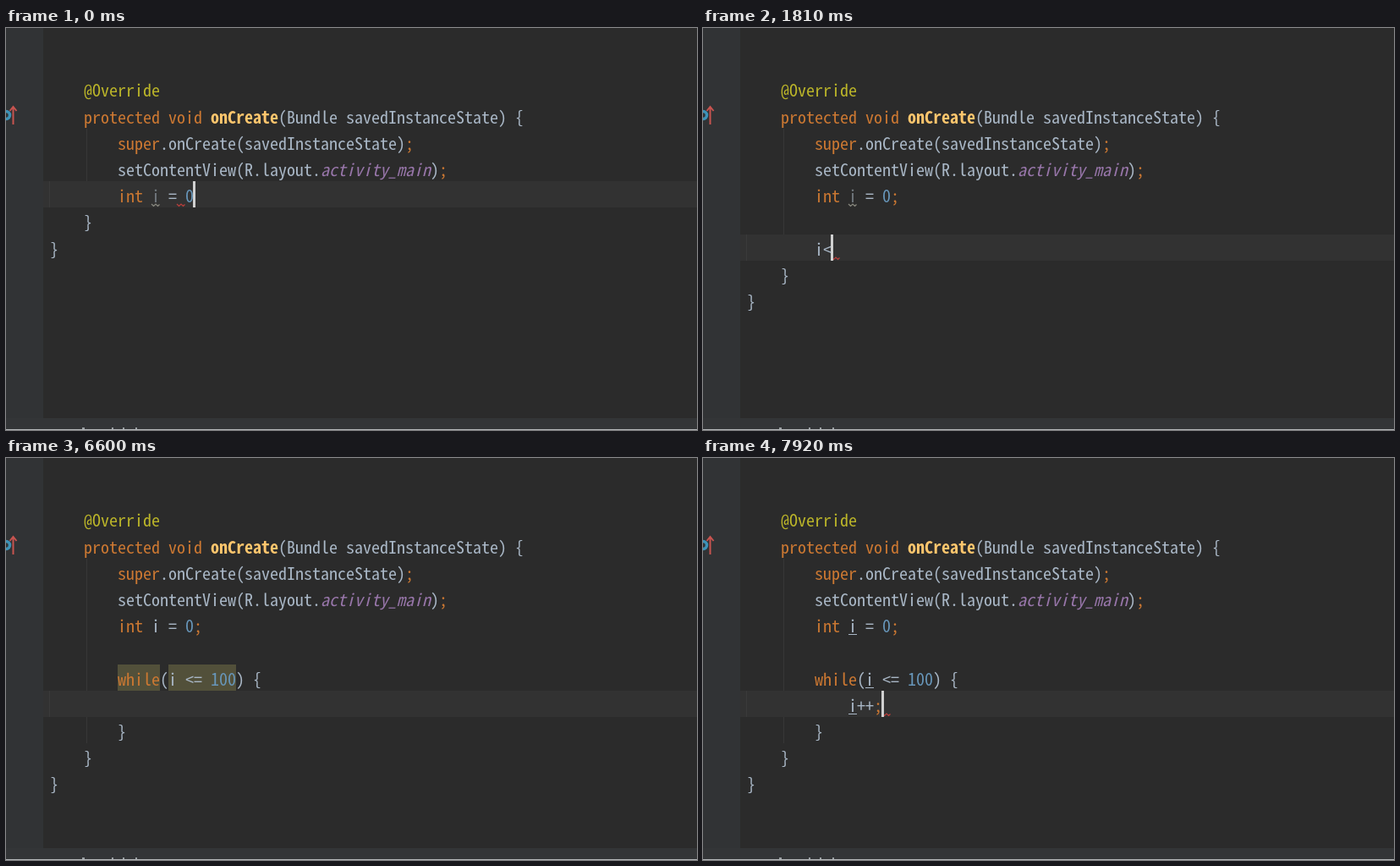
An HTML page that plays this animation: 817x475 px, repeating every 8 s.

```html
<!DOCTYPE html>
<html lang="en">
<head>
<meta charset="utf-8">
<title>Code editor</title>
<style>
  html, body { margin: 0; width: 100%; height: 100%; overflow: hidden; background: #2b2b2b; }
  svg { display: block; width: 817px; height: 475px; }
  text { text-anchor: middle; }
  .code { font-family: "Noto Sans Mono CJK SC", "Noto Sans Mono CJK JP", "Liberation Mono", monospace; }
  .icon { font: 15px Inter, sans-serif; }
</style>
</head>
<body>
<svg id="stage" viewBox="0 0 817 475" xmlns="http://www.w3.org/2000/svg"></svg>
<script>
const LOOP = 8000, LEFT = 52, CELL = 10;
const FAMILY = '"Noto Sans Mono CJK SC", "Noto Sans Mono CJK JP", "Liberation Mono", monospace';
const svg = document.getElementById('stage');

// Keep glyphs within the ten pixel grid whichever monospaced face is present.
const probe = document.createElement('canvas').getContext('2d');
probe.font = '20px ' + FAMILY;
const SIZE = 20 * Math.min(1, 10.6 / probe.measureText('m').width);

const C = {
  plain: '#a9b7c6', keyword: '#cc7832', number: '#6897bb', note: '#bbb529',
  method: '#ffc66d', field: '#9876aa', unused: '#72797f',
  match: '#9b5f70', item: '#8a9196', dim: '#6d7678'
};

const rowY = row => Math.round(56.4 + 31.2 * row);
const colX = col => LEFT + CELL * col;
const safe = s => s.replace(/&/g, '&amp;').replace(/</g, '&lt;');
const rect = (x, y, w, h, fill, more = '') =>
  `<rect x="${x}" y="${y}" width="${w}" height="${h}" fill="${fill}" ${more}/>`;
const circle = (x, y, r, look) => `<circle cx="${x}" cy="${y}" r="${r}" ${look}/>`;
const path = (d, look) => `<path d="${d}" ${look}/>`;

// One glyph per grid cell, word by word.
function words(x, y, str, fill, more = '') {
  return [...str.matchAll(/\S+/g)].map(m => {
    const xs = [...m[0]].map((_, i) => x + CELL * (m.index + i + 0.5)).join(' ');
    return `<text class="code" font-size="${SIZE}" x="${xs}" y="${y}" fill="${fill}" ${more}>${safe(m[0])}</text>`;
  }).join('');
}

const RULES = [
  [/@\w+/y, 'note'],
  [/(?<![.\w])(?:protected|void|super|int|while)\b|;/y, 'keyword'],
  [/onCreate(?=\(Bundle)/y, 'method', 'font-weight="700"'],
  [/activity_main/y, 'field', 'font-style="italic"'],
  [/\d+/y, 'number'],
  [/\w+|[^\w]/y, 'plain']
];

function codeLine(col, row, str, unused) {
  let out = '', at = 0;
  while (at < str.length) {
    for (const [rule, kind, more] of RULES) {
      rule.lastIndex = at;
      const hit = rule.exec(str);
      if (!hit) continue;
      const color = unused && hit[0] === 'i' ? C.unused : C[kind];
      out += words(colX(col + at), rowY(row) + 25, hit[0], color, more);
      at += hit[0].length;
      break;
    }
  }
  return out;
}

const wave = (col, row, color) =>
  path(`M${colX(col)} ${rowY(row) + 27}l2.5 2.5 2.5 -2.5 2.5 2.5 2 -2`,
    `fill="none" stroke="${color}" stroke-width="1.2"`);

const ITEMS = ['i', 'isActivityTransitionRunning()', 'isChangingConfigurations()',
  'isChild()', 'isDestroyed()', 'isDeviceProtectedStorage()'];

function itemIcon(x, y, k) {
  const badge = (color, letter) => circle(x + 17, y, 11, `fill="${color}"`) +
    `<text class="icon" x="${x + 17}" y="${y + 5}" fill="#35302f">${letter}</text>`;
  if (!k) return badge('#a27b3c', 'v') +
    circle(x + 42, y, 3, 'fill="none" stroke="#858b8f" stroke-width="2"');
  const lock = rect(x + 39, y - 2, 8, 7, '#4c7f45') +
    path(`M${x + 36} ${y - 1}v-3a2.5 2.5 0 0 1 5 0v3`, 'fill="none" stroke="#4c7f45" stroke-width="1.6"');
  const pin = k === 3
    ? path(`M${x + 5} ${y - 5}q0 -7 8 -7q0 5 -5 6z`, 'fill="#8a9196"') : '';
  return badge('#8b5763', 'm') + lock + pin;
}

function memberList(x, y) {
  let out = rect(x, y, 817 - x, 475 - y, '#3c3f41') +
    rect(x, y, 817 - x, 35, '#4b4f52') + rect(x, y, 1, 475 - y, '#55595b') +
    rect(x, y, 817 - x, 1, '#55595b');
  ITEMS.forEach((name, k) => {
    const dy = y + 33.8 * k, base = dy + 28, tx = x + 60;
    const rest = name.slice(1).replace('()', '');
    out += itemIcon(x, dy + 18.5, k) + words(tx, base, 'i', C.match) +
      words(tx + CELL, base, rest, C.item);
    if (k) out += words(tx + CELL * (1 + rest.length), base, '()', C.dim);
  });
  return out;
}

function templateList() {
  return rect(173.5, 275.5, 269, 34, '#45494b', 'stroke="#5b5f61"') +
    words(191, 303, 'while', '#8f969b') + words(281, 303, 'while (expr) {}', '#6a6f72');
}

const POPUPS = {
  first: () => memberList(72, 274),
  second: () => memberList(112, 305),
  template: templateList
};

const HEAD = [
  [4, '@Override'],
  [4, 'protected void onCreate(Bundle savedInstanceState) {'],
  [8, 'super.onCreate(savedInstanceState);'],
  [8, 'setContentView(R.layout.activity_main);']
];

// Each step changes part of the state before it.
const steps = [
  [0, { decl: 'int i = 0', unused: true, expr: '', body: '', end: 5, caret: [17, 4], error: [15, 4] }],
  [120, { decl: 'int i = 0;', caret: [18, 4] }],
  [250, { error: null }],
  [380, { end: 6, caret: [8, 5] }],
  [510, { end: 7, caret: [8, 6] }],
  [1100, { expr: 'i', caret: [9, 6] }],
  [1240, { popup: 'first', alpha: 0.7 }],
  [1380, { alpha: 1 }],
  [1530, { popup: null }],
  [1810, { expr: 'i<', caret: [10, 6], error: [10, 6] }],
  [2060, { unused: false }],
  [2330, { expr: 'i', caret: [9, 6], error: null, unused: true }],
  [2480, { expr: 'i<', caret: [10, 6], error: [10, 6], unused: false }],
  [2750, { expr: 'i<=', caret: [11, 6], error: [11, 6] }],
  [3150, { expr: 'i<=10', caret: [13, 6], error: [13, 6] }],
  [3400, { expr: 'i<=100', caret: [14, 6], error: [14, 6] }],
  [3700, { expr: 'i<=100.', caret: [15, 6], error: [15, 6] }],
  [4100, { expr: 'i<=100.wh', caret: [17, 6], error: [17, 6] }],
  [4380, { expr: 'i<=100.whi', caret: [18, 6], error: [18, 6] }],
  [4520, { popup: 'template', alpha: 0.3 }],
  [4670, { alpha: 0.6 }],
  [4820, { alpha: 0.85 }],
  [4960, { alpha: 1 }],
  [5550, { popup: null, expr: 'i<=100', caret: [14, 6], error: null }],
  [5700, { expr: 'while(i <= 100) {', end: 9, caret: [12, 7] }],
  [5850, { lit: true }],
  [6600, { hidden: true }],
  [6720, { hidden: false, body: 'i', caret: [13, 7], popup: 'second' }],
  [7090, { popup: null, body: 'i+', caret: [14, 7], lit: false }],
  [7290, { underline: true }],
  [7490, { body: 'i++', caret: [15, 7] }],
  [7770, { body: 'i++;', caret: [16, 7], underline: false }],
  [7920, { underline: true, error: [16, 7] }]
];

let merged = {};
const states = steps.map(([at, patch]) => [at, merged = { ...merged, ...patch }]);

function chrome() {
  const ring = circle(0, 103, 4.5, 'fill="#2f3437" stroke="#3d93b8" stroke-width="3.5"');
  const arrow = path('M8.5 114V93M4.5 98L8.5 93L12.5 98', 'fill="none" stroke="#c75450" stroke-width="2"');
  const marks = [[90, 3], [125, 2], [138, 2], [153, 2]]
    .map(([x, w]) => rect(x, 472, w, 2, '#9a9fa2')).join('');
  return rect(0, 0, 44, 475, '#313335') + ring + arrow +
    rect(0, 461, 817, 14, '#333537') + rect(0, 474, 817, 1, '#b4b8ba') + marks;
}

function draw(s) {
  const [col, row] = s.caret;
  let out = rect(0, 0, 817, 475, '#2b2b2b') + chrome();
  out += rect(95, rowY(2), 1, rowY(s.end) - rowY(2), '#373737');
  out += rect(44, rowY(row), 773, 31, '#323232') + rect(51, rowY(row), 1, 31, '#3a3a3a');
  if (s.lit) out += rect(132, 244, 50, 31, '#52503a') + rect(192, 244, 80, 31, '#52503a');

  HEAD.forEach(([c, str], r) => { out += codeLine(c, r, str); });
  out += codeLine(8, 4, s.decl, s.unused) + codeLine(8, 6, s.expr) + codeLine(12, 7, s.body);
  if (s.end === 9) out += codeLine(8, 8, '}');
  out += codeLine(4, s.end, '}') + codeLine(0, s.end + 1, '}');

  if (s.unused) out += wave(12, 4, '#8a8a80');
  if (s.error) out += wave(...s.error, '#bc3f3c');
  if (s.underline) {
    for (const [c, r] of [[12, 4], [14, 6], [12, 7]])
      out += rect(colX(c), rowY(r) + 27, CELL, 1, C.plain);
  }
  if (!s.hidden) out += rect(colX(col) - 1, rowY(row), 3, 31, '#d0d0d0');
  if (s.popup) out += `<g opacity="${s.alpha}">${POPUPS[s.popup]()}</g>`;
  svg.innerHTML = out;
}

let shown;
function tick() {
  const t = performance.now() % LOOP;
  const state = states.filter(([at]) => at <= t).pop()[1];
  if (state !== shown) draw(shown = state);
  requestAnimationFrame(tick);
}
tick();
</script>
</body>
</html>
```
